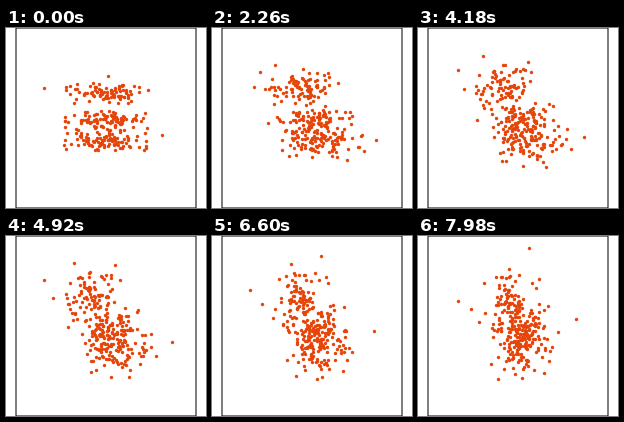
Animation of 200x180 px, one loop 8000 ms. Source, as a matplotlib script:

```python
import numpy as np
import matplotlib.pyplot as plt
from matplotlib.animation import FuncAnimation
from matplotlib.patches import Rectangle

W, H, DPI = 200, 180, 100
PX = 72 / DPI
TICK, LOOP = 20, 8000
LAST = 171

rng = np.random.default_rng(12)


class Path:
    """Straight way from start to end, bowed sideways in the middle."""

    def __init__(self, start, end, bow):
        self.start, self.end, self.bow = map(np.array, (start, end, bow))

    def at(self, u):
        return self.start + (self.end - self.start) * u + self.bow * np.sin(np.pi * u)


class Band:
    """Flat cloud that turns a quarter round into a taller one."""
    FLAT, TALL = np.array([19.5, 4.7]), np.array([14, 15])

    def __init__(self, count, path):
        self.path = path
        self.near, far = np.clip(rng.normal(size=(2, count, 2)), -2.1, 2.1)
        self.far = far * rng.uniform(.5, 1.3, (count, 1))

    def at(self, u):
        turn = u * np.pi / 2
        spread = (self.FLAT * self.near * np.cos(turn)
                  + self.TALL * self.far * np.sin(turn))
        return self.path.at(u) + spread


bands = [
    Band(90, Path((101, 65), (90, 66), (-11, -7))),
    Band(95, Path((100, 92), (106, 98), (2, 0))),
    Band(97, Path((99, 112), (104, 107), (8, 2))),
]
strays = [
    Path((156, 107), (158, 83), (9, 15)),
    Path((38, 60), (53, 73), (0, -6)),
    Path((64, 58), (40, 65), (-12, -20)),
    Path((102, 48), (84, 41), (-8, -7)),
    Path((128, 58), (111, 12), (-9, 0)),
    Path((60, 121), (80, 143), (14, 1)),
]


def step_at(ms):
    """Steps last 20, 100 and 20 ms in turn."""
    cycle, rest = divmod(ms, 140)
    return 3 * cycle + (rest >= 20) + (rest >= 120)


fig = plt.figure(figsize=(W / DPI, H / DPI), dpi=DPI, facecolor="white")
ax = fig.add_axes([0, 0, 1, 1])
ax.set_xlim(0, W)
ax.set_ylim(H, 0)
ax.axis("off")
ax.add_patch(Rectangle((10, 0), 180, 180, fill=False, ec="black", lw=PX, snap=False))
dots, = ax.plot([], [], "o", color="#e6450a", ms=3.4 * PX, mew=0)


def draw(i):
    u = step_at(i * TICK) / LAST
    xy = np.vstack([part.at(u) for part in bands + strays])
    dots.set_data(xy[:, 0], xy[:, 1])
    return dots,


anim = FuncAnimation(fig, draw, frames=LOOP // TICK, interval=TICK,
                     repeat=True, repeat_delay=0, blit=False)
plt.show()
```
